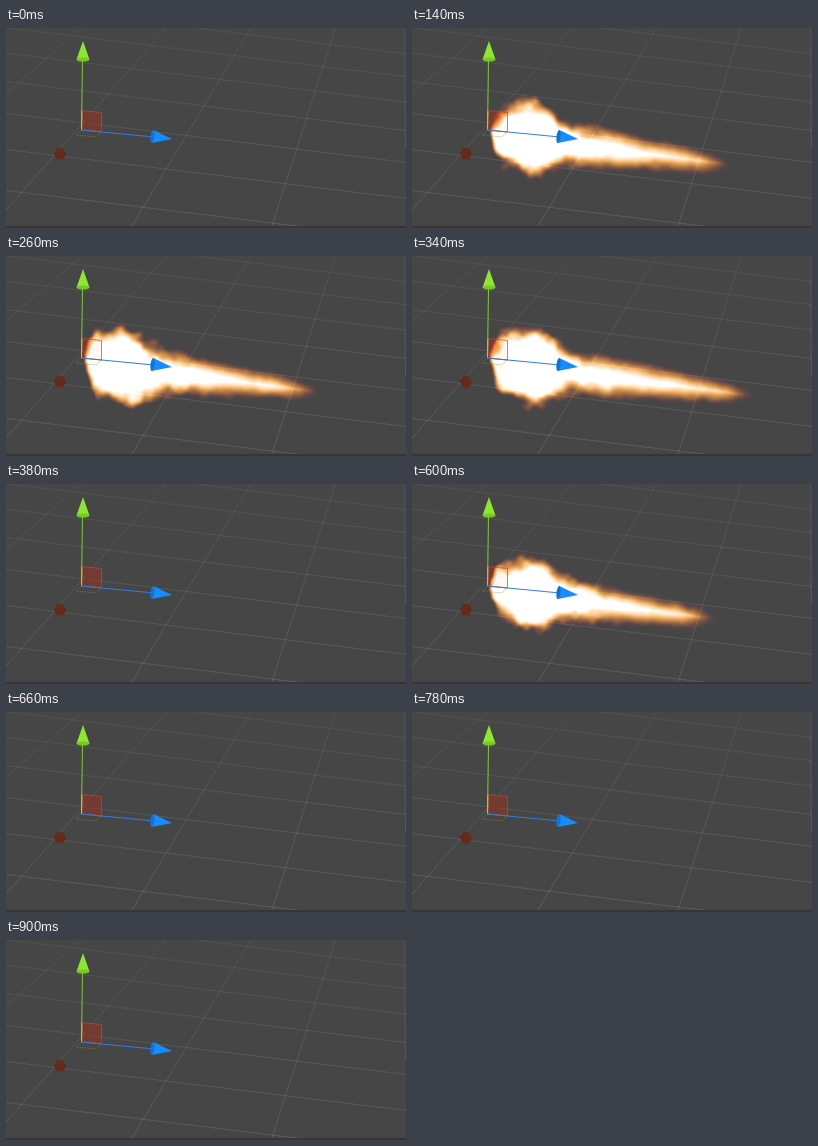
These frames come from a looping animation (400 by 200 pixels, 920 ms). An HTML page with a canvas:

```html
<!DOCTYPE html>
<html lang="en">
<head>
<meta charset="utf-8">
<title>Muzzle flash</title>
<style>
html, body { margin: 0; width: 100%; height: 100%; overflow: hidden; background: #464646; }
canvas { display: block; width: 400px; height: 200px; }
</style>
</head>
<body>
<canvas id="stage" width="400" height="200"></canvas>
<script>
const W = 400, H = 200, LOOP = 920, TICK = 20;
const ctx = document.getElementById('stage').getContext('2d');

const volley = (first, gap, count, hold) =>
  Array.from({ length: count }, (_, i) => ({ start: first + i * gap, hold }));
const shots = [...volley(120, 100, 3, 60), ...volley(460, 0, 1, 40), ...volley(600, 120, 3, 60)];

const clamp = v => Math.max(0, Math.min(1, v));
const mix = (a, b, t) => a + (b - a) * t;
function smooth(a, b, v) {
  const t = clamp((v - a) / (b - a));
  return t * t * (3 - 2 * t);
}

function hash(x, y, seed) {
  const n = Math.sin(x * 127.1 + y * 311.7 + seed * 74.7) * 43758.5453;
  return n - Math.floor(n);
}
function noise(x, y, seed) {
  const ix = Math.floor(x), iy = Math.floor(y);
  const fx = smooth(0, 1, x - ix), fy = smooth(0, 1, y - iy);
  return mix(
    mix(hash(ix, iy, seed), hash(ix + 1, iy, seed), fx),
    mix(hash(ix, iy + 1, seed), hash(ix + 1, iy + 1, seed), fx), fy);
}
const turbulence = (x, y, seed) =>
  noise(x / 12, y / 12, seed) * 0.7 + noise(x / 6, y / 6, seed + 9) * 0.3 - 0.5;

// Half height of the flame: a taper, a round head and a blunt rear end
function halfHeight(x, along) {
  const head = 14 * Math.exp(-(((x - 122) / 22) ** 2));
  const rear = 24 * (Math.max(0, 92 - x) / 14) ** 2;
  return 23 * (1 - along) + head - rear;
}

function renderFlash(seed, age, length) {
  const layer = document.createElement('canvas');
  layer.width = W;
  layer.height = H;
  const layerCtx = layer.getContext('2d');
  const image = layerCtx.createImageData(W, H);
  for (let x = 50; x < 378; x++) {
    const along = (x - 80) / (235 * length * (0.92 + age * 0.04));
    const half = halfHeight(x, along);
    const axis = 106 + (x - 85) * 0.13;
    const rough = mix(15, 4, smooth(130, 220, x));
    const fade = 1 - smooth(0.85, 1.08, along);
    for (let y = 55; y < 177; y++) {
      const depth = half - Math.abs(y - axis) + turbulence(x - age * 3, y, seed) * rough;
      const heat = clamp((depth + 13) / 21) * fade;
      const i = (y * W + x) * 4;
      image.data[i] = 195 * smooth(0.1, 0.8, heat);
      image.data[i + 1] = 190 * smooth(0.2, 1, heat);
      image.data[i + 2] = 190 * smooth(0.48, 1, heat);
      image.data[i + 3] = 255;
    }
  }
  layerCtx.putImageData(image, 0, 0);
  return layer;
}

shots.forEach((shot, s) => {
  const length = 1.06 + 0.1 * Math.sin(s * 4);
  shot.frames = Array.from({ length: shot.hold / TICK }, (_, age) => renderFlash(s + 1, age, length));
});

function line(x1, y1, x2, y2, color) {
  ctx.strokeStyle = color;
  ctx.beginPath();
  ctx.moveTo(x1, y1);
  ctx.lineTo(x2, y2);
  ctx.stroke();
}
function trace(points) {
  ctx.beginPath();
  points.forEach(([x, y]) => ctx.lineTo(x, y));
  ctx.closePath();
}
function fill(points, color) {
  trace(points);
  ctx.fillStyle = color;
  ctx.fill();
}
function outline(points, color) {
  trace(points);
  ctx.strokeStyle = color;
  ctx.stroke();
}

function cone(tipX, tipY, baseX, baseY, light, dark) {
  const radius = 6.5, angle = Math.atan2(tipY - baseY, tipX - baseX);
  const dx = -Math.sin(angle) * radius, dy = Math.cos(angle) * radius;
  fill([[tipX, tipY], [baseX + dx, baseY + dy], [baseX - dx, baseY - dy]], light);
  ctx.fillStyle = dark;
  ctx.beginPath();
  ctx.ellipse(baseX, baseY, 2, radius, angle, 0, Math.PI * 2);
  ctx.fill();
}

const plane = [[76, 82.5], [95.5, 84.5], [95.5, 104], [76, 102]];
const groundPlane = [[75, 102], [95, 104], [90, 109], [70, 107]];
const knob = Array.from({ length: 6 }, (_, i) =>
  [54 + 6.3 * Math.cos(i * Math.PI / 3), 125.8 + 6.3 * Math.sin(i * Math.PI / 3)]);

function drawFloor() {
  ctx.fillStyle = '#464646';
  ctx.fillRect(0, 0, W, H);
  const grid = ctx.createLinearGradient(0, 0, 0, H);
  grid.addColorStop(0, 'rgba(150,150,150,0.13)');
  grid.addColorStop(1, 'rgba(150,150,150,0.27)');
  for (let n = 0; n < 7; n++) {
    const y = 9093 / (14.4 + n) - 469;
    line(0, y, W, y + 49, grid);
  }
  for (let n = 0; n < 4; n++) {
    const foot = 266 - n * 140;
    line(foot, 198, foot + (0.32 + n * 0.28) * 198, 0, grid);
  }
  line(398.5, 0, 399.5, 120, grid);
  ctx.fillStyle = '#3b3335';
  ctx.fillRect(0, 198, W, 2);
  fill(plane, 'rgba(160,45,30,0.5)');
}

function drawGizmo() {
  outline(groundPlane, 'rgba(120,150,50,0.35)');
  outline(plane, 'rgba(190,72,50,0.7)');
  line(75.5, 102, 76.5, 31, '#83c83c');
  line(75.5, 102, 75.8, 83, '#c3c13c');
  line(75, 102, 148, 109, '#2d7fe0');
  cone(77, 13, 77, 31.5, '#8fe632', '#78c62a');
  cone(166, 111, 146.5, 108.5, '#168cff', '#1672d0');
  fill(knob, '#652a1e');
}

function draw() {
  const t = performance.now() % LOOP;
  drawFloor();
  const shot = shots.find(({ start, hold }) => t >= start && t < start + hold);
  if (shot) {
    ctx.globalCompositeOperation = 'lighter';
    ctx.drawImage(shot.frames[Math.floor((t - shot.start) / TICK)], 0, 0);
    ctx.globalCompositeOperation = 'source-over';
  }
  drawGizmo();
  requestAnimationFrame(draw);
}
draw();
</script>
</body>
</html>
```
